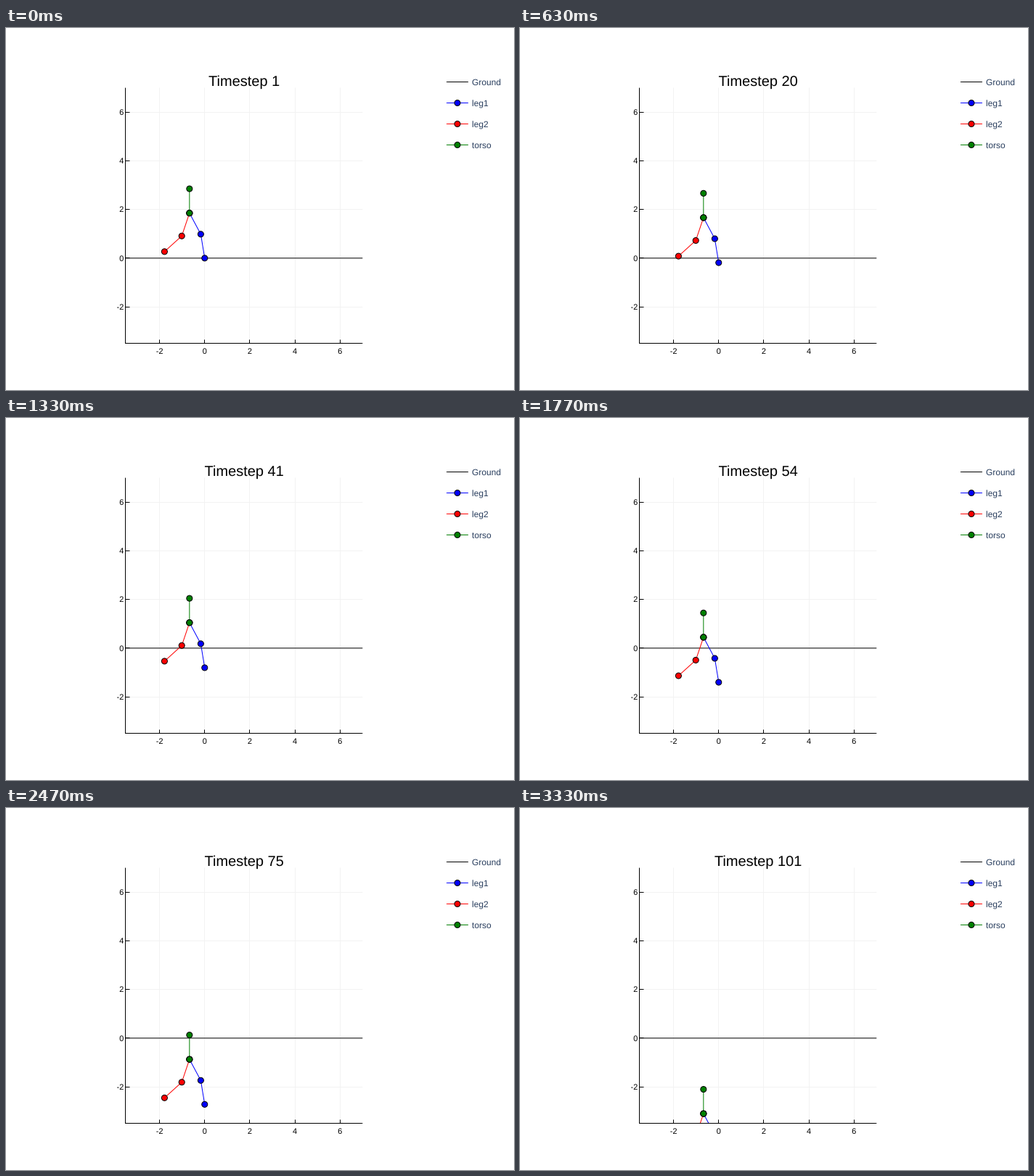
Recreate the animation shown at these times as a matplotlib script. Size 700 px wide and 500 px high, loop 3360 ms.

```python
import numpy as np
import matplotlib.pyplot as plt
from matplotlib.animation import FuncAnimation
from matplotlib.patches import Circle, PathPatch, Rectangle
from matplotlib.textpath import TextPath
from matplotlib.transforms import Affine2D

plt.rcParams["font.family"] = "Liberation Sans"

WIDTH, HEIGHT, DPI = 700, 500, 100
PX = 72 / DPI                      # one pixel in points
LEFT, RIGHT, TOP, BOTTOM = 165, 491.3, 82.6, 435.5
LOW, HIGH = -3.5, 7
GRAVITY, DT = 9.81, 0.01
TICK_MS, LOOP_MS = 10, 3360


def px_x(x):
    return LEFT + (np.asarray(x) - LOW) * (RIGHT - LEFT) / (HIGH - LOW)


def px_y(y):
    return BOTTOM - (np.asarray(y) - LOW) * (BOTTOM - TOP) / (HIGH - LOW)


def crisp(v):
    return np.floor(v) + 0.5


fig = plt.figure(figsize=(WIDTH / DPI, HEIGHT / DPI), dpi=DPI, facecolor="white")
ax = fig.add_axes([0, 0, 1, 1])
ax.set_xlim(0, WIDTH)
ax.set_ylim(HEIGHT, 0)
ax.axis("off")
clip = Rectangle((LEFT, TOP), RIGHT - LEFT, BOTTOM - TOP, transform=ax.transData)


def stroke(xs, ys, color="black", z=2):
    line, = ax.plot(xs, ys, color=color, lw=PX, zorder=z,
                    solid_capstyle="butt", snap=False)
    return line


def dot(x, y, color, z=3):
    return ax.add_patch(Circle((x, y), 4, fc=color, ec="black", lw=PX, zorder=z))


def advance(text, size):
    """Pen advance of a text, side bearings included."""
    def end(s):
        return TextPath((0, 0), s, size=size).get_extents().x1
    return end(text + "|") - end("|")


def text_path(x, y, text, size, align=0.0):
    """Outlines with the baseline on a whole pixel; align is 0 left to 1 right."""
    start = x - align * advance(text, size)
    flip = Affine2D().scale(1, -1).translate(start, np.round(y))
    return flip.transform_path(TextPath((0, 0), text, size=size))


def label(*args, color="black"):
    return ax.add_patch(PathPatch(text_path(*args), fc=color, lw=0, zorder=6))


# Grid, ticks and axis lines
for v in (-2, 0, 2, 4, 6):
    gx, gy = crisp(px_x(v)), crisp(px_y(v))
    stroke([gx, gx], [TOP, BOTTOM], "#f2f2f2", z=1)
    stroke([LEFT, RIGHT], [gy, gy], "#f2f2f2", z=1)
    stroke([gx, gx], [430.5, BOTTOM], z=5)
    stroke([LEFT, 170.5], [gy, gy], z=5)
    label(px_x(v), 450, str(v), 11, 0.5)
    label(162.3, px_y(v) + 3.85, str(v), 11, 1)
stroke([164.5, 164.5], [TOP, 436], z=5)
stroke([164, RIGHT], [435.5, 435.5], z=5)
stroke([LEFT, RIGHT], [px_y(0)] * 2)

# Legend
entries = [("Ground", "black"), ("leg1", "blue"), ("leg2", "red"), ("torso", "green")]
for row, (name, color) in enumerate(entries):
    y = 74.5 + 29 * row
    stroke([607, 637], [y, y], color)
    if row:
        dot(622, y, color)
    label(642, y + 4.68, name, 12, color="#2a3f5f")


# Walker with unit-length links, set by each link's angle from vertical
def link(point, degrees, sign=1):
    a = np.radians(degrees)
    return point + sign * np.array([-np.sin(a), np.cos(a)])


foot1 = np.zeros(2)
knee1 = link(foot1, 10)
hip = link(knee1, 30)
knee2 = link(hip, -20, -1)
foot2 = link(knee2, -50, -1)
head = link(hip, 0)

limbs = []
for i, (color, joints) in enumerate([("blue", [foot1, knee1, hip]),
                                     ("red", [hip, knee2, foot2]),
                                     ("green", [hip, head])]):
    xs, ys = np.transpose(joints)
    z = 3 + i / 10
    line = stroke(px_x(xs), px_y(ys), color, z)
    dots = [dot(x, y, color, z + 0.05) for x, y in zip(px_x(xs), px_y(ys))]
    for part in [line, *dots]:
        part.set_clip_path(clip)
    limbs.append((line, dots, ys))

title = label((LEFT + RIGHT) / 2, 80, "Timestep 1", 20, 0.5)


def update(tick):
    step = (6 * tick + 3) // 20    # 30 steps a second, rounded to 10 ms
    drop = GRAVITY * DT ** 2 * step * (step + 1) / 2
    for line, dots, ys in limbs:
        new_ys = px_y(ys - drop)
        line.set_ydata(new_ys)
        for d, y in zip(dots, new_ys):
            d.center = d.center[0], y
    title.set_path(text_path((LEFT + RIGHT) / 2, 80, f"Timestep {step + 1}", 20, 0.5))
    return [title]


anim = FuncAnimation(fig, update, frames=LOOP_MS // TICK_MS, interval=TICK_MS,
                     repeat=True, repeat_delay=0, blit=False)
plt.show()
```
